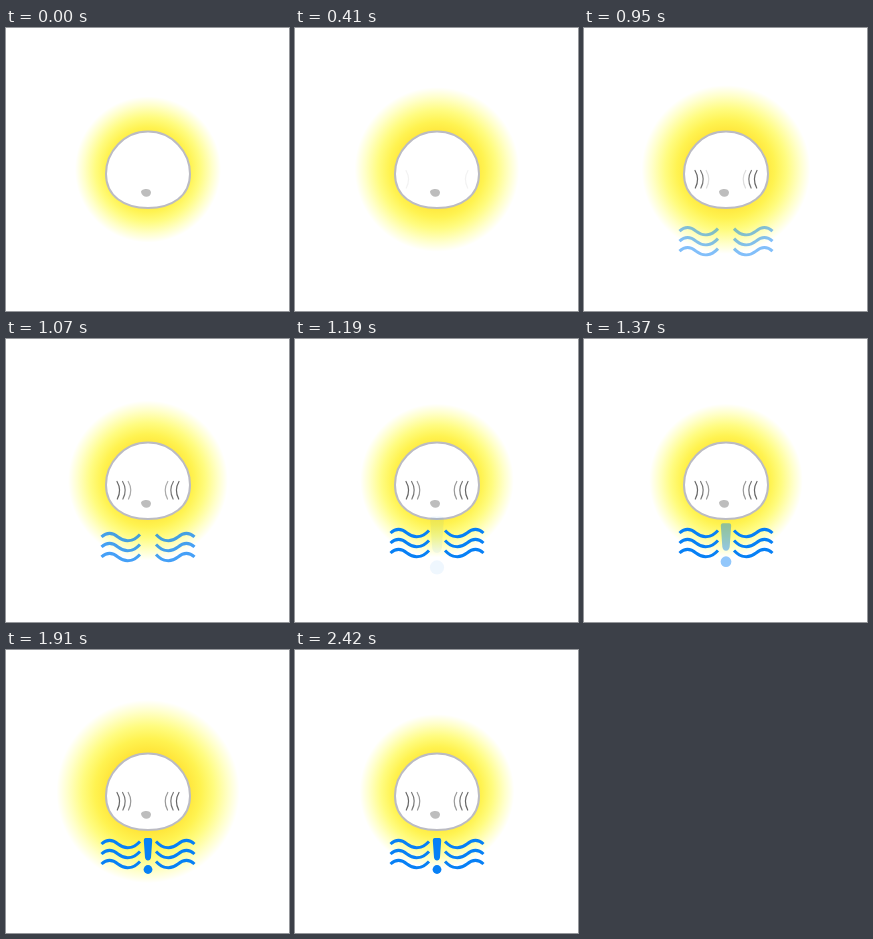
Animation of 283x283 px, one loop 2.65 s. Source, as an HTML page with a canvas:

```html
<!DOCTYPE html>
<html lang="en">
<head>
<meta charset="utf-8">
<title>Glowing face</title>
<style>
  html, body { margin: 0; width: 100%; height: 100%; overflow: hidden; background: #fff; }
  canvas { display: block; width: 283px; height: 283px; }
</style>
</head>
<body>
<canvas width="283" height="283"></canvas>
<script>
const ctx = document.querySelector('canvas').getContext('2d');
const LOOP = 2650, START = 170, END = 2420, STEP = 30;
const CX = 142;
const BLUE = '#0780f5';

const progress = (t, from, duration) => Math.min(1, Math.max(0, (t - from) / duration));
const mix = (a, b, p) => a + (b - a) * p;
const wave = p => (1 - Math.cos(Math.PI * p)) / 2;

// Draws the left half, then its mirror image.
function mirrored(draw) {
  draw();
  ctx.save();
  ctx.translate(CX * 2, 0);
  ctx.scale(-1, 1);
  draw();
  ctx.restore();
}

// Grows once from rest, then breathes.
function glowRadius(t) {
  return t < 650
    ? mix(73, 91.5, wave(progress(t, START, 480)))
    : mix(91.5, 76, wave((t - 650) / 630));
}

function drawGlow(t) {
  const r = glowRadius(t);
  const glow = ctx.createRadialGradient(CX, 141.5, 0, CX, 141.5, r);
  glow.addColorStop(0.4, '#ffe234');
  glow.addColorStop(0.58, '#fff351');
  glow.addColorStop(0.72, '#fffc80');
  glow.addColorStop(0.88, '#ffffcb');
  glow.addColorStop(1, '#ffffff');
  ctx.fillStyle = glow;
  ctx.fillRect(0, 0, 283, 283);
}

function drawFace() {
  ctx.beginPath();
  ctx.moveTo(142, 103.5);
  ctx.bezierCurveTo(166, 103.5, 184, 124, 184, 146);
  ctx.bezierCurveTo(184, 168, 166, 180, 142, 180);
  ctx.bezierCurveTo(118, 180, 100, 168, 100, 146);
  ctx.bezierCurveTo(100, 124, 118, 103.5, 142, 103.5);
  ctx.fillStyle = '#fff';
  ctx.fill();
  ctx.lineWidth = 2;
  ctx.strokeStyle = '#bbbbc3';
  ctx.stroke();

  ctx.beginPath();
  ctx.moveTo(135, 164);
  ctx.bezierCurveTo(135, 160.5, 145, 159.5, 145, 164.5);
  ctx.bezierCurveTo(145, 170, 136, 170.5, 135, 164);
  ctx.fillStyle = '#bdbdbd';
  ctx.fill();
}

function drawCheeks(t) {
  ctx.lineWidth = 1.2;
  ctx.lineCap = 'round';
  ['#666', '#777', '#999'].forEach((color, i) => {
    ctx.globalAlpha = progress(t, 390 + i * 240, 240);
    ctx.strokeStyle = color;
    mirrored(() => {
      const x = 111 + i * 5.6;
      ctx.beginPath();
      ctx.moveTo(x, 142.5);
      ctx.quadraticCurveTo(x + 5, 151, x + 0.3, 160);
      ctx.stroke();
    });
  });
  ctx.globalAlpha = 1;
}

function drawWaves(t) {
  const p = progress(t, 710, 480);
  const lift = 21 * (1 - p) ** 1.2;
  ctx.globalAlpha = p;
  ctx.strokeStyle = BLUE;
  ctx.lineWidth = 3;
  ctx.lineCap = 'butt';
  for (let row = 0; row < 3; row++) {
    const y = 194 + row * 10 + lift;
    mirrored(() => {
      ctx.beginPath();
      ctx.moveTo(95.5, y);
      ctx.bezierCurveTo(101, y - 5, 106, y - 5, 112, y);
      ctx.bezierCurveTo(119, y + 5.5, 127, y + 5, 134, y - 2.5);
      ctx.stroke();
    });
  }
  ctx.globalAlpha = 1;
}

function drawExclamation(t) {
  const p = progress(t, 1160, 480);
  const size = 1 + 0.7 * (1 - p) ** 2;
  ctx.save();
  ctx.globalAlpha = p;
  ctx.translate(CX, 205);
  ctx.scale(size, size);
  ctx.fillStyle = BLUE;
  ctx.beginPath();
  ctx.moveTo(-2.5, -17);
  ctx.lineTo(2.5, -17);
  ctx.quadraticCurveTo(4.4, -17, 4.2, -14.5);
  ctx.lineTo(3, 2.5);
  ctx.quadraticCurveTo(2.4, 5.5, 0, 5.5);
  ctx.quadraticCurveTo(-2.4, 5.5, -3, 2.5);
  ctx.lineTo(-4.2, -14.5);
  ctx.quadraticCurveTo(-4.4, -17, -2.5, -17);
  ctx.fill();
  ctx.beginPath();
  ctx.arc(0, 14.5, 4.4, 0, Math.PI * 2);
  ctx.fill();
  ctx.restore();
}

function render(now) {
  const elapsed = now % LOOP;
  const t = elapsed < START
    ? 0
    : Math.min(END, START + Math.floor((elapsed - START) / STEP) * STEP);
  drawGlow(t);
  drawFace();
  drawCheeks(t);
  drawWaves(t);
  drawExclamation(t);
}

const begin = performance.now();
function tick() {
  render(performance.now() - begin);
  requestAnimationFrame(tick);
}
tick();
</script>
</body>
</html>
```
